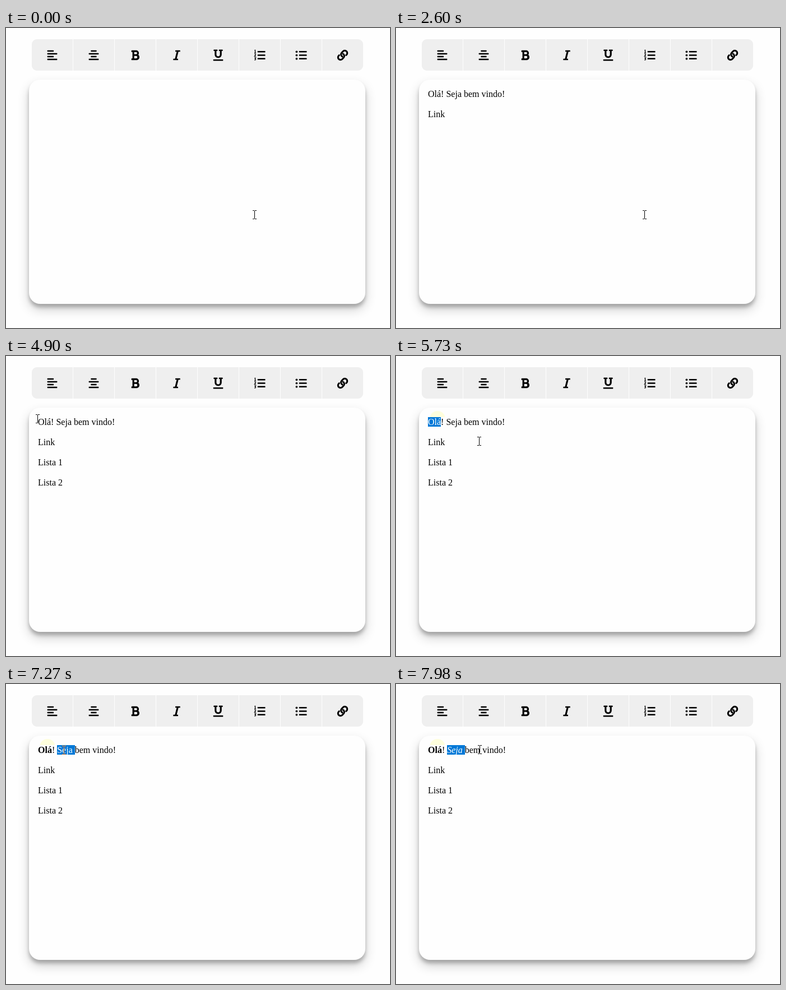
Animation of 685x535 px, one loop 8 s. Source, as an HTML page:

```html
<!DOCTYPE html>
<html lang="pt">
<head>
<meta charset="utf-8">
<style>
html, body { margin: 0; width: 100%; height: 100%; overflow: hidden; background: #fefefe; }
#bar { position: absolute; left: 46px; top: 20px; width: 591px; height: 56px; display: flex; gap: 1px; border-radius: 9px; overflow: hidden; }
#bar div { width: 73px; background: #efefef; }
#bar div.hover { background: #54a9e8; }
#page { position: absolute; left: 41px; top: 92px; width: 600px; height: 400px; border-radius: 20px; background: #fefefe;
  box-shadow: 0 10px 20px rgba(0,0,0,.19), 0 6px 6px rgba(0,0,0,.23); }
#text { position: absolute; left: 57px; top: 109px; font: 16px/18px "Liberation Serif", "Times New Roman", serif; white-space: pre; color: #000; }
.sel { background: #0078d7; color: #fff; }
.caret { display: inline-block; width: 1px; height: 17px; margin-right: -1px; vertical-align: top; background: #000; }
#over { position: absolute; left: 0; top: 0; mix-blend-mode: normal; }
#beam { position: absolute; left: 0; top: 0; mix-blend-mode: difference; }
</style>
</head>
<body>
<div id="bar"></div>
<div id="page"></div>
<div id="text"></div>
<svg id="over" width="685" height="535">
  <clipPath id="above"><path d="M40 92H110V109H40Z"/></clipPath>
  <circle id="trace" cx="74" cy="112" r="14" fill="#ff0" opacity=".13" clip-path="url(#above)"/>
  <circle id="halo" r="14" fill="#ff0" opacity=".4"/>
  <path id="arrow" d="M.5 .5V16.5L4.2 13 6.8 18.8 9.2 17.8 6.7 12.1H11.8Z" fill="#fff" stroke="#000"/>
</svg>
<svg id="beam" width="7" height="16" fill="#fff"><path d="M0 0H3V1H4V0H7V1H4V15H7V16H4V15H3V16H0V15H3V1H0Z"/></svg>
<script>
const $ = id => document.getElementById(id);

// Toolbar icons on a grid of 512 units, 20 px high
const line = (x, y, w) => `<rect x="${x}" y="${y}" width="${w}" height="64" rx="15"/>`;
const rows = [64, 224, 384].map(y => line(160, y, 352)).join('');
const path = d => `<path d="${d}"/>`;
const stroke = (d, w, more = '') => `<path d="${d}" fill="none" stroke="#000" stroke-width="${w}" ${more}/>`;
const dots = [96, 256, 416].map(y => `<circle cx="48" cy="${y}" r="48"/>`).join('');
const digits = 'M20 32L52 20V140M16 138H88M18 204Q50 172 74 200Q84 222 22 306H90M18 366H80L48 412Q82 416 76 450Q62 486 14 468';
const chain = 'M98 256L73 281A112 112 0 0 0 231 439L298 372A112 112 0 0 0 298 214Q285 201 270 193';
const round = 'stroke-linecap="round"';
const icons = [
  [448, line(0, 32, 288) + line(0, 160, 448) + line(0, 288, 288) + line(0, 416, 448)],
  [448, line(96, 32, 256) + line(0, 160, 448) + line(96, 288, 256) + line(0, 416, 448)],
  [384, path('M333 238a122 122 0 0 0 27-65C368 96 308 32 233 32H34a16 16 0 0 0-16 16v48a16 16 0 0 0 16 16h32v288H34a16 16 0 0 0-16 16v48a16 16 0 0 0 16 16h209c71 0 134-52 141-122 5-49-16-92-51-120zM146 112h87a48 48 0 0 1 0 96h-87zm87 288h-87V288h87a56 56 0 0 1 0 112z')],
  [320, path('M320 48v32a16 16 0 0 1-16 16h-63l-80 320h47a16 16 0 0 1 16 16v32a16 16 0 0 1-16 16H16a16 16 0 0 1-16-16v-32a16 16 0 0 1 16-16h63l80-320h-47a16 16 0 0 1-16-16V48a16 16 0 0 1 16-16h192a16 16 0 0 1 16 16z')],
  [448, line(16, 0, 176) + line(256, 0, 176) + line(0, 448, 448) + stroke('M104 40V224a120 120 0 0 0 240 0V40', 80)],
  [512, rows + stroke(digits, 32)],
  [512, rows + dots],
  [512, stroke(chain, 78, round) + stroke(chain, 78, round + ' transform="rotate(180 256 256)"')]
];
$('bar').innerHTML = icons.map(([w, art]) =>
  `<div><svg width="73" height="56"><g transform="translate(${36.5 - w * 5 / 256} 18.5) scale(${5 / 128})">${art}</g></svg></div>`).join('');
const buttons = [...$('bar').children];

// Typing bursts: first key, last key, keys
const bursts = [
  [20, 680, 'Olá! S'],
  [860, 1010, 'eja '],
  [1150, 1780, 'bem vindo!\n\n'],
  [1940, 2350, 'Link\n'],
  [2490, 2490, '\n'],
  [2700, 3250, 'Lista 1\n'],
  [3350, 3900, '\nLista 2']
];
const typed = t => bursts.map(([a, b, s]) => {
  if (t < a) return '';
  const step = (b - a) / Math.max(1, s.length - 1);
  return step ? s.slice(0, Math.floor((t - a) / step + 1.001)) : s;
}).join('');

// Pointer: time, x, y
const track = [
  [0, 443, 333], [4000, 443, 333], [4070, 442, 332], [4180, 442, 332],
  [4350, 360, 270], [4600, 150, 150], [4750, 52, 115], [4900, 56, 112], [5010, 56, 112],
  [5250, 74, 112], [5490, 74, 112], [5570, 66, 140], [5660, 105, 185], [5800, 190, 120],
  [5930, 258, 55], [6120, 239, 35], [6640, 239, 35], [6800, 215, 85], [7000, 130, 122],
  [7120, 103, 121], [7200, 103, 121], [7260, 103, 118], [7420, 103, 118], [7520, 230, 95],
  [7590, 306, 50], [7650, 310, 46], [7720, 387, 120], [7790, 240, 243], [7870, 5, 175],
  [7960, 149, 117], [8000, 149, 117]
];
function pointer(t) {
  const i = track.findIndex(k => k[0] > t);
  const [a, x, y] = track[i - 1], [b, u, v] = track[i], p = (t - a) / (b - a);
  return [Math.round(x + (u - x) * p), Math.round(y + (v - y) * p)];
}

const mark = s => s && `<span class="sel">${s}</span>`;
function content(t) {
  const s = typed(t);
  if (t < 5010) {
    const caret = t > 20 && t < 4000 && !(t > 2550 && t < 2700);
    return s + (caret ? '<span class="caret"></span>' : '');
  }
  const n = Math.min(3, Math.floor((t - 5010) / 75));
  const first = t < 7150 ? mark(s.slice(0, n)) + s.slice(n, 3) : s.slice(0, 3);
  const second = t < 7150 ? 'Seja ' : mark(t < 7640 ? 'Seja ' : '<i>Seja </i>');
  return (t < 6600 ? first : `<b>${first}</b>`) + '! ' + second + s.slice(10);
}

const show = (el, on) => el.style.display = on ? '' : 'none';
let last;
function draw(now) {
  const t = now % 8000, html = content(t), [x, y] = pointer(t);
  if (html !== last) $('text').innerHTML = last = html;
  const inPage = x > 41 && x < 641 && y > 92 && y < 492;
  show($('beam'), inPage);
  show($('arrow'), !inPage);
  $('beam').style.transform = `translate(${x - 3}px,${y - 8}px)`;
  $('arrow').setAttribute('transform', `translate(${x} ${y})`);
  $('halo').setAttribute('cx', x);
  $('halo').setAttribute('cy', y);
  show($('halo'), t > 4940 && t < 5290 || t > 7120 && t < 7200);
  show($('trace'), t >= 5290);
  buttons.forEach((b, i) => b.classList.toggle('hover', y >= 20 && y < 76 && Math.floor((x - 46) / 74) === i));
}
const start = performance.now();
(function tick() {
  draw(performance.now() - start);
  requestAnimationFrame(tick);
})();
</script>
</body>
</html>
```
